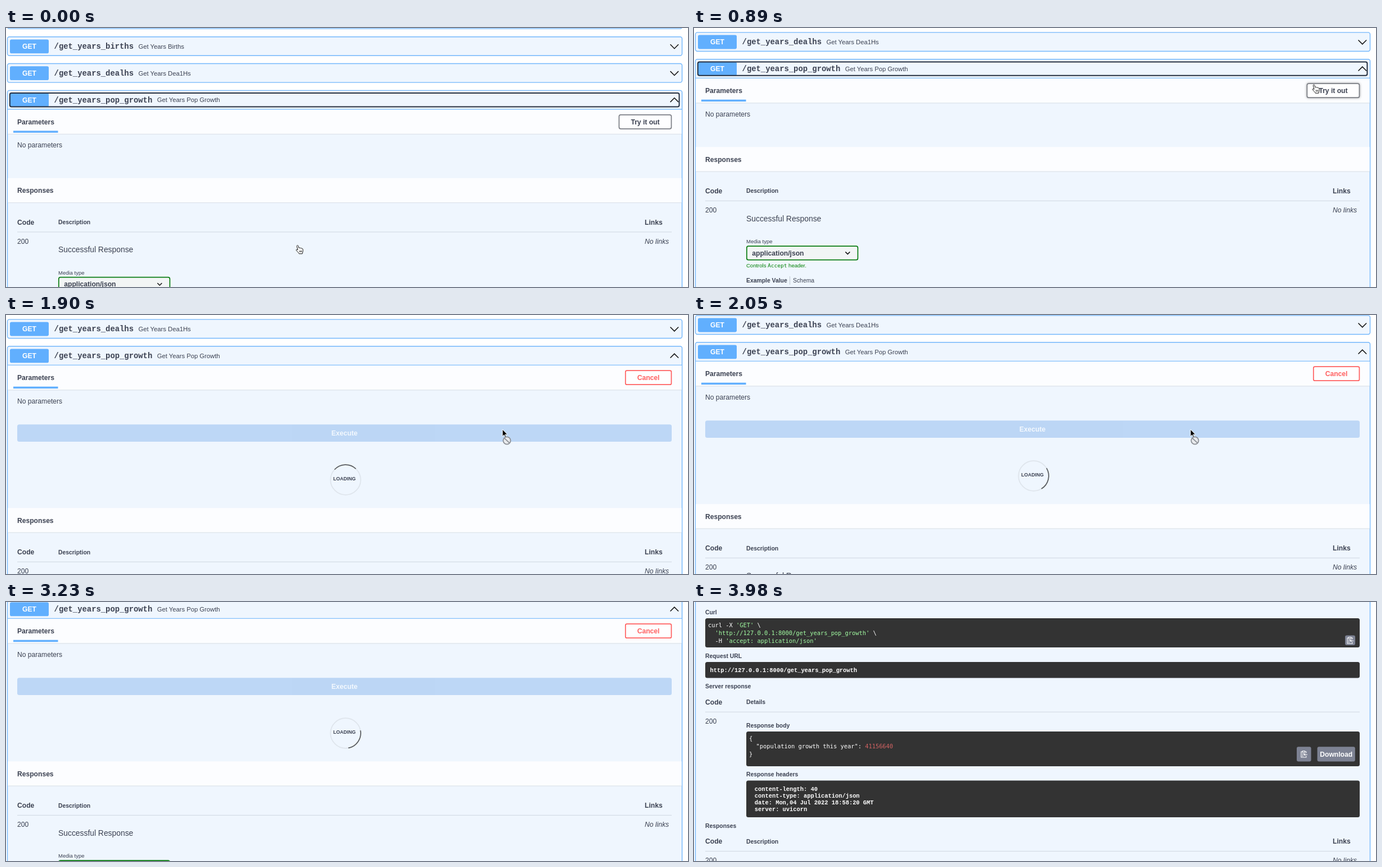
Recreate the animation shown at these times as an HTML page. Size 1213 by 462 pixels, loop 4580 ms.

```html
<!DOCTYPE html>
<html lang="en">
<head>
<meta charset="utf-8">
<title>API docs</title>
<style>
  html, body { margin: 0; width: 100%; height: 100%; overflow: hidden; background: #fff; }
  svg { display: block; width: 100vw; height: 100vh; }
  text { font: 12.12px "Liberation Sans", Arial, sans-serif; fill: #3b4151; white-space: pre; }
  .b { font-weight: 700; }
  .i { font-style: italic; }
  .m { text-anchor: middle; }
  .white { fill: #fff; }
  .s95 { font-size: 9.53px; }
  .s10 { font-size: 10.39px; }
  .s11 { font-size: 11.26px; }
  .s14 { font-size: 13.86px; }
  .path { font: 700 13.86px "Liberation Mono", "Courier New", monospace; }
  .raw { font: 700 10.39px "Liberation Mono", "Courier New", monospace; fill: #fff; }
  .code { font: 10.39px "DejaVu Sans Mono", Menlo, monospace; fill: #fff; }
  .str { fill: #a2fca2; }
  .num { fill: #d36363; }
  .ok { fill: #008000; }
  .block { fill: #eff6fe; stroke: #73b7fc; stroke-width: 1.4; }
  .band { fill: #fcfdff; }
  .rule { stroke: #cfd7e1; stroke-width: 1; }
  .edge { stroke: #dde3ea; stroke-width: 1.2; }
  .arrow { fill: none; stroke: #111; stroke-width: 1.5; }
  .btn { fill: #fefeff; stroke-width: 1.73; }
  .dark { fill: #333; }
  .grey { fill: #7d8293; }
  .glow { filter: drop-shadow(0 0 2px rgba(0, 0, 0, .35)); }
</style>
</head>
<body>
<svg viewBox="0 0 1213 462" preserveAspectRatio="none">
  <defs>
    <g id="get">
      <rect x="7" y="-12.3" width="69" height="24.8" rx="2.8" fill="#61affe"/>
      <text class="b m white" x="41.5" y="4.3">GET</text>
    </g>
    <path id="down" class="arrow" d="M1181.5 -3.4l7.3 7.4 7.3-7.4"/>
    <path id="up" class="arrow" d="M1181.5 3.8l7.3-7.4 7.3 7.4"/>
    <g id="clip" fill="none" stroke="#fff" stroke-width="1.1">
      <path d="M4 2.2H1.2v10h9v-2.4M7.6 2.2h2.6v2.4M3.6 1h4.2v2.4H3.6zM3 6h4M3 8.2h2M3 10.2h2"/>
      <path d="M12.4 7.4H6.4m2-2l-2 2 2 2"/>
    </g>
    <g id="columns">
      <text class="b" x="20" y="0">Code</text>
      <text class="b s10" x="93" y="-.5">Description</text>
      <text class="b" x="1136" y="0">Links</text>
      <path class="rule" d="M20 13.4H1184"/>
      <text x="20" y="34.3">200</text>
      <text class="i" x="1136" y="34.3">No links</text>
    </g>
  </defs>

  <g id="page">
    <rect class="block" x="2.5" y="-32" width="1200" height="33.4" rx="3.5"/>
    <g transform="translate(0 32.7)">
      <rect class="block" x="2.5" y="-17" width="1200" height="33.6" rx="3.5"/>
      <use href="#get"/><use href="#down"/>
      <text class="path" x="85.6" y="4.4">/get_years_births</text>
      <text class="s11" x="235.5" y="4">Get Years Births</text>
    </g>
    <g transform="translate(0 80.5)">
      <rect class="block" x="2.5" y="-17" width="1200" height="33.6" rx="3.5"/>
      <use href="#get"/><use href="#down"/>
      <text class="path" x="85.6" y="4.4">/get_years_dealhs</text>
      <text class="s11" x="235.5" y="4">Get Years Dea1Hs</text>
    </g>

    <rect class="block" x="2.5" y="111.4" width="1200" height="900" rx="3.5"/>
    <g transform="translate(0 128.3)">
      <use href="#get"/><use href="#up"/>
      <text class="path" x="85.6" y="4.4">/get_years_pop_growth</text>
      <text class="s11" x="268.7" y="4">Get Years Pop Growth</text>
      <rect id="focus" x="6.8" y="-12.3" width="1190.6" height="24.4" rx="3" fill="none" stroke="#263040" stroke-width="2"/>
    </g>

    <rect class="band" x="3.2" y="145" width="1198.6" height="44.2"/>
    <path d="M3 145H1202" stroke="#84c0fc" stroke-width="1.3"/>
    <path class="edge" d="M3.2 189.4H1201.8"/>
    <text class="b" x="20" y="171.7">Parameters</text>
    <rect x="13" y="183.3" width="79.5" height="3.5" fill="#61affe"/>
    <g id="try">
      <rect class="btn" x="1090.4" y="154.8" width="93" height="25" rx="3" stroke="#7c7f86"/>
      <text class="b m" x="1137" y="171.7">Try it out</text>
    </g>
    <g id="cancel">
      <rect class="btn" x="1101.8" y="154.8" width="81.6" height="25" rx="2.5" stroke="#ff6060"/>
      <text class="b m" x="1142.6" y="171.7" style="fill:#ff6060">Cancel</text>
    </g>
    <text x="20" y="213.4">No parameters</text>
    <g id="execute">
      <rect x="20" y="250.8" width="1164" height="30.8" rx="3.5" fill="#4990e2"/>
      <text class="b m white" x="602" y="270.8">Execute</text>
    </g>
    <g id="loading">
      <circle cx="604" cy="349.6" r="26.85" fill="none" stroke="rgba(85,85,85,.1)" stroke-width="1.73"/>
      <path id="arc" d="M-18.99 -18.99A26.85 26.85 0 0 1 18.99 -18.99" fill="none" stroke="rgba(0,0,0,.6)" stroke-width="1.73"/>
      <text class="b m" x="602" y="351" style="font-size:8.66px">LOADING</text>
    </g>

    <g id="lower">
      <rect class="band" x="3.2" y="267.8" width="1198.6" height="43.7"/>
      <path class="edge" d="M3.2 311.7H1201.8"/>
      <text class="b" x="20" y="294.2">Responses</text>
      <use href="#columns" y="350.5"/>
      <text class="s14" x="93" y="400.2">Successful Response</text>
      <text class="s95" x="93" y="439.6">Media type</text>
      <rect x="93.8" y="444.7" width="197.6" height="24.6" rx="3" fill="#f2f5f5" stroke="#0b7d12" stroke-width="1.73"/>
      <text class="b" x="103.3" y="461.2">application/json</text>
      <path class="arrow" d="M269.3 455l4 4 4-4"/>
      <text class="s95 ok" x="93" y="483.1">Controls <tspan class="code ok" style="font-size:9.53px">Accept</tspan> header.</text>
      <text class="b s10" x="93" y="509.6">Example Value</text>
      <path d="M170.5 498.5v15" stroke="#bfc6cf"/>
      <text class="s10" x="176" y="509.6">Schema</text>
    </g>
  </g>

  <g id="result">
    <rect class="block" x="2.5" y="-20" width="1200" height="520"/>
    <text class="b s10" x="20" y="22">Curl</text>
    <rect class="dark" x="20" y="29" width="1164" height="52" rx="3.5"/>
    <text class="code" x="25" y="45">curl -X <tspan class="str">'GET'</tspan> \</text>
    <text class="code" x="37.5" y="59"><tspan class="str">'http://127.0.0.1:8000/get_years_pop_growth'</tspan> \</text>
    <text class="code" x="37.5" y="73">-H <tspan class="str">'accept: application/json'</tspan></text>
    <rect class="grey" x="1158" y="59.5" width="18" height="17.6" rx="3"/>
    <use href="#clip" x="1160.8" y="61.8"/>
    <text class="b s10" x="20" y="99.6">Request URL</text>
    <rect class="dark" x="20" y="107" width="1164" height="28.6" rx="3.5"/>
    <text class="raw" x="28.5" y="124.8">http://127.0.0.1:8000/get_years_pop_growth</text>
    <text class="b s10" x="20" y="154.2">Server response</text>
    <text class="b" x="20" y="182.8">Code</text>
    <text class="b s10" x="93" y="182.2">Details</text>
    <path class="rule" d="M20 196.2H1184"/>
    <text x="20" y="217">200</text>
    <text class="b s10" x="93" y="223.6">Response body</text>
    <rect class="dark" x="93" y="231" width="1091" height="62" rx="3.5"/>
    <text class="code" x="98" y="247">{</text>
    <text class="code" x="110.5" y="261">"population growth this year": <tspan class="num">41156640</tspan></text>
    <text class="code" x="98" y="274.8">}</text>
    <rect class="grey" x="1072" y="258.2" width="25.6" height="26.4" rx="3"/>
    <use href="#clip" x="1078.7" y="264.8"/>
    <rect class="grey" x="1108.6" y="258.2" width="67.2" height="26.4" rx="3"/>
    <text class="b m white" x="1142.2" y="275.8">Download</text>
    <text class="b s10" x="93" y="311.4">Response headers</text>
    <rect class="dark" x="93" y="318.5" width="1091" height="65.5" rx="3.5"/>
    <text class="raw" x="107.8" y="336.6">content-length: 40</text>
    <text class="raw" x="107.8" y="348.8">content-type: application/json</text>
    <text class="raw" x="107.8" y="361">date: Mon,04 Jul 2022 18:58:20 GMT</text>
    <text class="raw" x="107.8" y="373.2">server: uvicorn</text>
    <text class="b s10" x="20" y="402.6">Responses</text>
    <use href="#columns" y="431.2"/>
  </g>

  <g id="cursor" stroke-linejoin="round">
    <g id="hand" stroke="#111" stroke-width="1">
      <path fill="#fff" d="M3 9L1.3 2.4C.9.4 3.2-.1 3.8 1.7L5 5.6C5.6 4.7 7.3 4.9 7.6 5.9 8.3 5.1 9.7 5.4 10 6.5 10.8 5.9 11.9 6.5 12 7.8L12.2 10.6C12.2 12.6 11.2 13.6 11 15.7H5.2C4.8 13.8 2.4 12.2.4 9.8-.6 8.4.9 7.3 3 9z"/>
      <path d="M6.3 10v3M8 10v3M9.7 10v3" fill="none" stroke-width=".8"/>
    </g>
    <path id="pointer" d="M3.5-1v12.6l2.9-2.7 1.9 4.3 1.9-.8L8.3 8.2h4z" stroke="#fff" stroke-width="1"/>
    <g id="blocked">
      <circle cx="11.4" cy="19" r="6.6" fill="#e9ebee" stroke="#8d9197" stroke-width="1.8"/>
      <path d="M7 14.8l8.8 8.4" stroke="#8d9197" stroke-width="1.8"/>
    </g>
  </g>
</svg>
<script>
  const LOOP = 4580;
  const TICKS = [0, 150, 300, 440, 590, 740, 890, 1030, 1180, 1320, 1470, 1620, 1760, 1910,
    2050, 2200, 2350, 2500, 2640, 2790, 2940, 3090, 3240, 3380, 3530, 3680, 3830, 3980];
  // Keys are [tick, value]; the value eases from one key to the next.
  const SCROLL = [[0, 0], [4, 55.6], [13, 55.6], [14, 62.6], [17, 115.6]];
  const CURSOR_X = [[3, 516], [6, 1100], [8, 1100], [10, 879.5]];
  const CURSOR_Y = [[3, 387], [6, 100.5], [8, 100.5], [10, 205]];

  const $ = id => document.getElementById(id);
  const show = (id, on) => { $(id).style.display = on ? "" : "none"; };
  const move = (id, x, y, extra = "") => $(id).setAttribute("transform", `translate(${x} ${y})${extra}`);

  function at(keys, k) {
    const n = keys.findIndex(key => key[0] > k);
    if (n < 0) return keys[keys.length - 1][1];
    if (n === 0) return keys[0][1];
    const [a, from] = keys[n - 1], [b, to] = keys[n];
    const p = (k - a) / (b - a);
    return from + (to - from) * p * p * (3 - 2 * p);
  }

  function draw(time) {
    const t = time % LOOP;
    const k = TICKS.filter(x => x <= t).length - 1;
    const open = k >= 8, busy = k >= 12, done = k >= 27;
    const moving = k === 4 || k === 5 || k === 9;

    show("page", !done);
    show("result", done);
    show("focus", !open);
    show("try", !open);
    show("cancel", open);
    show("execute", open);
    show("loading", busy);
    $("try").classList.toggle("glow", k >= 6);
    $("execute").classList.toggle("glow", k >= 10 && !busy);
    $("execute").setAttribute("opacity", busy ? .3 : 1);

    move("page", 0, -at(SCROLL, k));
    move("lower", 0, busy ? 132.1 : open ? 31.3 : 0);
    move("arc", 604, 349.6, ` rotate(${(TICKS[k] - 1766) * .366})`);

    show("cursor", k < 17);
    show("hand", !moving && !busy);
    show("pointer", moving || busy);
    show("blocked", busy);
    move("cursor", at(CURSOR_X, k), at(CURSOR_Y, k));
  }

  const start = performance.now();
  function frame() {
    draw(performance.now() - start);
    requestAnimationFrame(frame);
  }
  frame();
</script>
</body>
</html>
```
